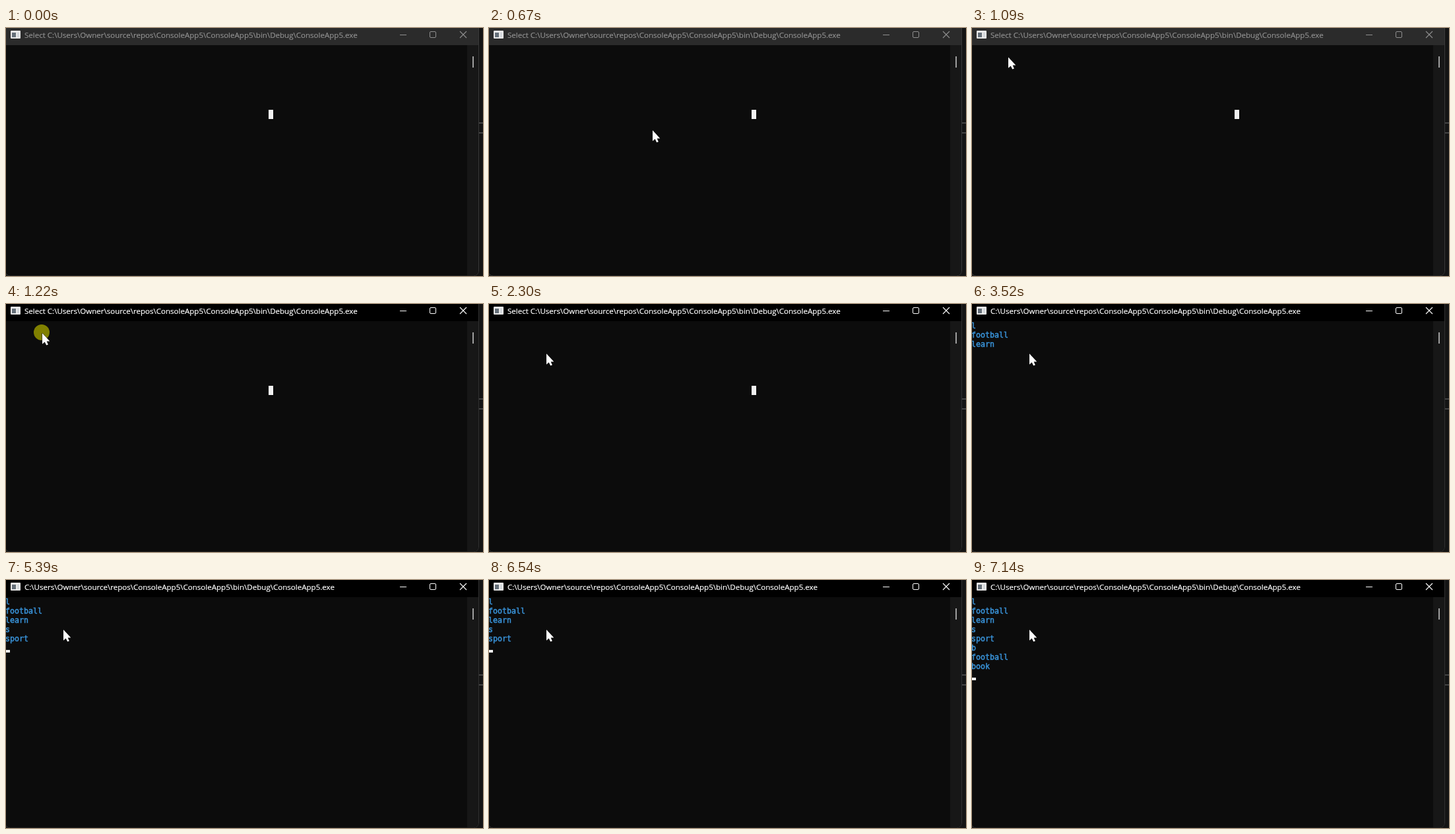
Write an HTML page that moves like this. It is 723 px wide and 376 px high and loops after 8 s.

```html
<!DOCTYPE html>
<html lang="en">
<head>
<meta charset="utf-8">
<title>Console</title>
<style>
html, body { margin: 0; width: 100%; height: 100%; overflow: hidden; background: #141414; }
svg { display: block; width: 723px; height: 376px; }
#title { font: 11.55px "Open Sans", "Noto Sans", sans-serif; stroke-width: .2; }
#lines { font: 11.63px "DejaVu Sans Mono", monospace; fill: #3a96dd; stroke: #3a96dd; stroke-width: .45; }
</style>
</head>
<body>
<svg viewBox="0 0 723 376">
  <path d="M717 144h6M717 159h6" stroke="#444" stroke-width="2"/>
  <rect id="frame" x="-1.5" y="-20" width="718" height="396" rx="8" fill="#0c0c0c"/>
  <rect x="699" y="26" width="17" height="343" fill="#171717"/>
  <path d="M699 369h17q-1 5-6 6h-11z" fill="#171717"/>
  <rect x="707" y="43" width="2" height="17" fill="#9f9f9f"/>
  <rect id="bar" width="716" height="26"/>
  <rect x="7" y="4" width="15" height="12" rx="1" fill="#e8e8e8"/>
  <rect x="9" y="7" width="6" height="7" fill="#66707a"/>
  <rect x="17" y="7" width="3" height="7" fill="#d4d8dc"/>
  <text id="title" x="28" y="15"></text>
  <g id="buttons" fill="none">
    <path d="M597 10.5h10"/>
    <rect x="642.5" y="5.5" width="9" height="9" rx="1.5"/>
    <path d="M688 5l10 10m0-10l-10 10" stroke-width="1.1"/>
  </g>
  <rect id="block" x="398" y="124" width="7" height="14" fill="#f2f2f2"/>
  <g id="lines"></g>
  <rect id="caret" width="7" height="4" fill="#f2f2f2"/>
  <circle id="click" cx="54" cy="43" r="12" fill="#808000"/>
  <path id="arrow" d="M0 -.8V15.7L3.7 12.4L6.2 17.6L8.9 16.5L6.7 11.6H11.4Z" fill="#fff" stroke="#000" stroke-width=".8" paint-order="stroke"/>
</svg>
<script>
const LOOP = 8000, STEP = 70, ROW = 14, COL = 7, TOP = 26;
const PATH = "C:\\Users\\Owner\\source\\repos\\ConsoleApp5\\ConsoleApp5\\bin\\Debug\\ConsoleApp5.exe";
const $ = id => document.getElementById(id);
const show = (el, on) => el.setAttribute("visibility", on ? "visible" : "hidden");

// Output rows: [time, text]
const rows = [
  [2630, "l"], [3450, "football"], [3520, "learn"], [5050, "s"],
  [5390, "sport"], [6800, "b"], [7070, "football"], [7140, "book"]
].map(([at, text], i) => {
  const el = document.createElementNS("http://www.w3.org/2000/svg", "text");
  el.textContent = text;
  el.setAttribute("x", -1);
  el.setAttribute("y", TOP + ROW * i + 11);
  $("lines").append(el);
  return { at, el };
});

// Caret spans: [on, off, column, row]
const carets = [
  [1770, 2300, 0, 0], [2630, 2830, 1, 0], [3170, 3380, 0, 1],
  [4400, 4930, 0, 3], [5050, 5390, 1, 3], [5390, 5990, 0, 5],
  [6540, 6800, 0, 5], [6800, 7070, 1, 5], [7140, LOOP, 0, 8]
];

// Progress in discrete steps, as the pointer is sampled
const stepped = (t, start, end) =>
  Math.max(0, Math.min(1, Math.floor((t - start) / STEP) * STEP / (end - start)));

function pointer(t) {
  const sweep = 1 - (1 - stepped(t, 390, 1090)) ** 2;
  const nudge = stepped(t, 1290, 1570);
  const ease = nudge * nudge * (3 - 2 * nudge);
  return [591 - 536 * sweep + 32 * ease, 353 - 308 * sweep + 31 * ease];
}

function draw(t) {
  const active = t >= 1220, selecting = t < 2630;
  const ink = active ? "#fff" : "#8f8f8f";
  $("bar").setAttribute("fill", active ? "#000" : "#2b2b2b");
  $("frame").setAttribute("stroke", active ? "#303030" : "#383838");
  $("title").setAttribute("fill", ink);
  $("title").setAttribute("stroke", ink);
  $("title").textContent = (selecting ? "Select " : "") + PATH;
  $("buttons").setAttribute("stroke", ink);
  show($("block"), selecting);
  rows.forEach(r => show(r.el, t >= r.at));

  const c = carets.find(([on, off]) => t >= on && t < off);
  show($("caret"), c);
  if (c) {
    $("caret").setAttribute("x", c[2] * COL - 1);
    $("caret").setAttribute("y", TOP + ROW * (c[3] + 1) - 4);
  }

  show($("click"), t >= 1220 && t < 1360);
  show($("arrow"), t >= 390);
  $("arrow").setAttribute("transform", `translate(${pointer(t)})`);
}

const start = performance.now();
function tick() {
  draw((performance.now() - start) % LOOP);
  requestAnimationFrame(tick);
}
tick();
</script>
</body>
</html>
```
